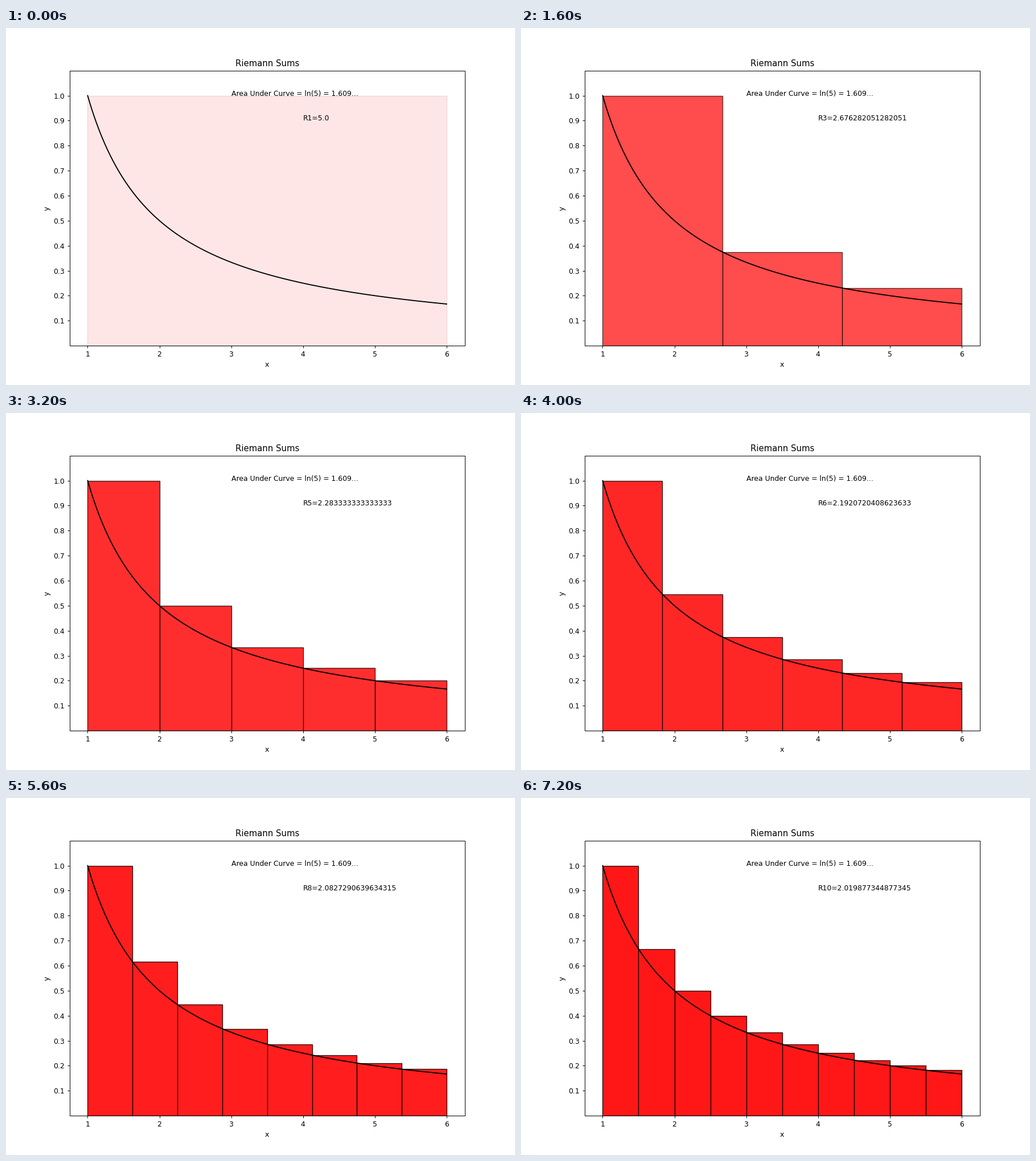
A matplotlib script that plays this animation: 894 px wide and 626 px high, repeating every 8 s.

```python
import math

import matplotlib.pyplot as plt
import numpy as np
from matplotlib.animation import FuncAnimation

A, B = 1, 6
STEPS = 10
DPI = 89.5
W, H = 894, 626                     # stage in pixels
PLOT_W, PLOT_H = 10 * DPI, 7 * DPI  # layout, trimmed to the stage

fig, ax = plt.subplots(figsize=(W / DPI, H / DPI), dpi=DPI)
kx, ky = PLOT_W / W, PLOT_H / H
fig.subplots_adjust(left=0.125 * kx, right=0.9 * kx,
                    bottom=0.11 * ky, top=0.88 * ky)


def left_sum(n):
    """Left Riemann sum of 1/x on [A, B], rounded only once."""
    span = B - A
    dens = [n * A + span * k for k in range(n)]
    common = math.lcm(*dens)
    return sum(span * common // d for d in dens) / common


def draw(i):
    n = i + 1
    dx = (B - A) / n
    left = A + dx * np.arange(n)

    ax.clear()
    ax.bar(left, 1 / left, dx, align="edge", color="red",
           edgecolor="black", alpha=1 - 0.9 / n)
    x = np.linspace(A, B, 500)
    ax.plot(x, 1 / x, color="black", lw=1.5)

    ax.text(3, 1, "Area Under Curve = ln(5) = 1.609...")
    ax.text(4, 0.9, f"R{n}={left_sum(n)}")
    ax.set_title("Riemann Sums")
    ax.set_xlabel("x")
    ax.set_ylabel("y")
    ax.set_xlim(0.75, 6.25)
    ax.set_ylim(0, 1.1)
    ax.set_xticks(range(A, B + 1))
    ax.set_yticks([k / 10 for k in range(1, 11)])
    return []


anim = FuncAnimation(fig, draw, frames=STEPS, interval=800,
                     init_func=lambda: draw(0), repeat=True, repeat_delay=0)
plt.show()
```
